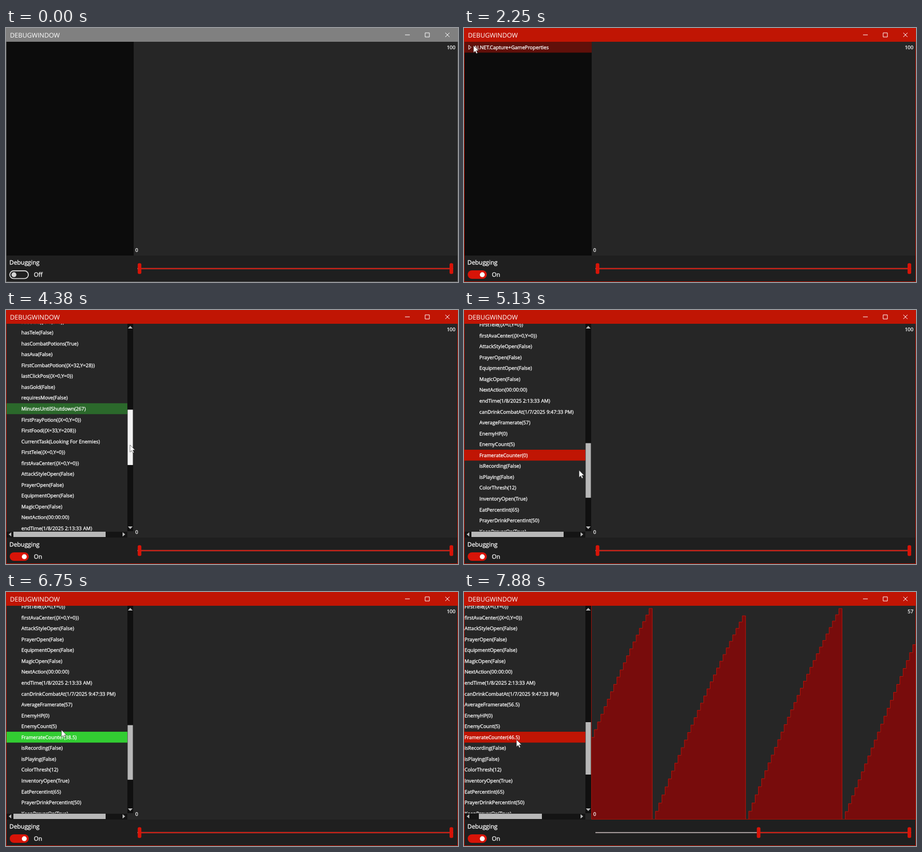
An HTML page that plays this animation: 853 px wide and 480 px high, repeating every 8 s.

```html
<!DOCTYPE html>
<html lang="en">
<head>
<meta charset="utf-8">
<title>Debug window</title>
<style>
  html, body { margin: 0; width: 100%; height: 100%; overflow: hidden; background: #1f1f1f; }
  svg { display: block; width: 853px; height: 480px; }
  text { font: 9.35px "Open Sans", "Noto Sans", sans-serif; fill: #fff; stroke: #fff; stroke-width: .3px;
    text-rendering: geometricPrecision; white-space: pre; }
  .title { font-size: 12.1px; stroke: none; }
  .label { font-size: 11.3px; }
</style>
</head>
<body>
<svg id="stage" viewBox="0 0 853 480"></svg>
<script>
const LOOP = 8000, STEP = 125, ROW = 20.55;
const TOGGLE = 1125, LISTED = 1500, EXPAND = 2625, SELECT = 7250, PLOT = 7500;
const RED = '#c01504', LIME = '#32cd32', PANEL = '#262626', GREY = '#b8b8b8';
const FRAMERATE = 'FramerateCounter', AVERAGE = 'AverageFramerate';

const point = '({X=0,Y=0})';
const items = `ContinueLoginScreenOpen(False)|withinFightArea(False)|LoginScreenOpen(False)
canCheckLocation(True)|StayInFightArea(False)|ReUpSupplies(False)|HPLevel(98)|playingScript(False)
FirstGold${point}|IsUnderAttack(False)|EquipmentDialogOpen(False)|EaseEndPoint${point}
isMouseDown(False)|BankOpen(False)|PrayerLevel(0)|canDrinkCombat(True)
WindowRect({X=1215,Y=648,Width=820,Height=640})|SuperCombatStarted(False)|hasFood(True)
hasPrayPotions(False)|isLoggedIn(True)|needsHeal(False)|CombatOpen(False)|isMoving(False)
TargetFound(False)|lastEnemyPos${point}|FirstAva${point}|hasTele(False)|hasCombatPotions(True)
hasAva(False)|FirstCombatPotion({X=32,Y=28})|lastClickPos${point}|hasGold(False)
requiresMove(False)|MinutesUntilShutdown(267)|FirstPrayPotion${point}|FirstFood({X=33,Y=208})
CurrentTask(Looking For Enemies)|FirstTele${point}|firstAvaCenter${point}|AttackStyleOpen(False)
PrayerOpen(False)|EquipmentOpen(False)|MagicOpen(False)|NextAction(00:00:00)
endTime(1/8/2025 2:13:33 AM)|canDrinkCombatAt(1/7/2025 9:47:33 PM)|${AVERAGE}|EnemyHP(0)
EnemyCount(5)|${FRAMERATE}|isRecording(False)|isPlaying(False)|ColorThresh(12)
InventoryOpen(True)|EatPercentInt(65)|PrayerDrinkPercentInt(50)|KeepPrayerOn(True)`.split(/[|\n]/);

// Rows that light up on a change and fade: name, start, colour
const flashes = [
  ['MinutesUntilShutdown', 4075, LIME], ['EnemyCount', 5575, RED], [AVERAGE, 7265, LIME]
];
const cursorPath = [
  [500, 150, 490], [1000, 24, 464], [1250, 24, 464], [2125, 18, 33], [2750, 18, 33],
  [3125, 29, 57], [3500, 234, 104], [3625, 234, 104], [4375, 234, 255], [4750, 234, 316],
  [5000, 234, 316], [5875, 116, 224], [6250, 116, 224], [7000, 99, 279]
];
const scrollPath = [[3625, 0], [4375, 569], [4750, 810]];

function follow(path, t) {
  const i = path.findIndex(p => p[0] > t);
  if (i < 0) return path[path.length - 1].slice(1);
  if (i === 0) return path[0].slice(1);
  const a = path[i - 1], b = path[i], k = (t - a[0]) / (b[0] - a[0]);
  return a.slice(1).map((v, j) => v + (b[j + 1] - v) * k);
}

const rect = (x, y, w, h, fill, more = '') =>
  `<rect x="${x}" y="${y}" width="${w}" height="${h}" fill="${fill}" ${more}/>`;
const path = (d, fill, stroke = 'none', more = '') =>
  `<path d="${d}" fill="${fill}" stroke="${stroke}" ${more}/>`;
const text = (x, y, s, more = '') => `<text x="${x}" y="${y}" ${more}>${s}</text>`;

// Frames counted since the last whole second; sample 0 is the latest reset
const sampleAt = t => 22 + Math.floor((t - 7875) * 0.0295 + 0.8);
const climb = (p, slope) => p * slope + p * (29 - p) * 0.01;
function frameRate(k) {
  if (k >= 0) return k % 29 * 2.12;
  if (k >= -30) return climb(k + 30, 1.94);
  if (k >= -59) return climb(k + 59, 1.93);
  return climb(((k + 59) % 29 + 29) % 29, 2);
}
const half = v => Math.floor(v * 2) / 2;

function titleBar(on) {
  const c = on ? RED : '#808080';
  return rect(0, 0, 853, 26, c) +
    path('M.5 26V479.5H852.5V26', 'none', on ? RED : '#555') +
    text(7.5, 17.7, 'DEBUGWINDOW', 'class="title"') +
    path('M753 13h9M791 9.2h8v7.8h-8zM829 9l8 8m0-8l-8 8', 'none', '#fff');
}

function rowContent(name, t) {
  if (name === FRAMERATE) return `${name}(${half(frameRate(sampleAt(t)))})`;
  if (name === AVERAGE) return `${name}(${t < SELECT ? 57 : 56.5})`;
  return name;
}

function rowLight(name, t) {
  if (name === FRAMERATE) {
    const k = sampleAt(t);
    return [t >= SELECT || frameRate(k) < frameRate(k - 1) ? RED : LIME, 1];
  }
  const f = flashes.find(([n]) => name.startsWith(n + '(') || name === n);
  return f && t >= f[1] ? [f[2], Math.max(0, 1 - (t - f[1]) / 500)] : [PANEL, 0];
}

function list(t) {
  if (t < LISTED) return '';
  const open = t >= EXPAND, [scroll] = follow(scrollPath, t);
  const shift = t >= SELECT ? 28 : 0, width = open ? 228 : 240;
  let s = open ? rect(1, 26, 240, 404, PANEL) : '';
  s += '<g clip-path="url(#list)">';
  const top = 26 - scroll;
  if (t >= 2000) s += rect(1, top, width, ROW, '#60100a');
  s += text(19 - shift, top + 13.7, 'AI.NET.Capture+GameProperties');
  s += open ? path(`M7 ${top + 13}h6v-6z`, RED)
            : path(`M9 ${top + 6.5}v8l4.5-4z`, 'none', '#fff');
  if (open) items.forEach((name, i) => {
    const y = top + (i + 1) * ROW;
    if (y < 0 || y > 420) return;
    const [color, alpha] = rowLight(name, t);
    if (alpha) s += rect(1, y, width, ROW, color, `opacity="${alpha}"`);
    s += text(29 - shift, y + 13.7, rowContent(name, t));
  });
  s += '</g>';
  return open ? s + scrollBars(t, scroll) : s;
}

function scrollBars(t, scroll) {
  const late = t >= SELECT, drag = t >= 3500 && t <= 5000;
  const y = late ? 246 : 39 + scroll * 0.2625, h = late ? 99 : 108 - scroll * 0.006;
  return rect(229, 26, 11, 392, '#101010') + rect(1, 419, 228, 11, '#141414') +
    rect(229.5, y, 10, h, drag ? '#f2f2f2' : GREY) +
    rect(late ? 28 : 14, 419, late ? 119 : 174, 10, GREY) +
    path('M230 35h9l-4.5-5zM230 409h9l-4.5 5zM10 420v8l-5-4zM220 420v8l5-4z', GREY);
}

function chart(t) {
  if (t < PLOT) return '';
  const last = sampleAt(t), w = 6.07, end = 853;
  let d = `M${end - 101 * w} 430`;
  for (let i = 100; i >= 0; i--) {
    d += `V${430 - frameRate(last - i) / 57 * 404}H${end - i * w}`;
  }
  return `<g clip-path="url(#chart)">${path(d + 'V430Z', '#780c0c', '#b8140a')}</g>` +
    path('M240.5 26V429.5H852', 'none', '#a01208');
}

function slider(t) {
  const x = t < SELECT ? 252 : 532 + (t - 7375) * 0.048;
  const thumb = cx => rect(cx - 3.4, 444.5, 6.8, 20.2, '#d81408', 'rx="2.5"');
  return rect(248, 453.8, 596, 1.7, '#c4b8b8') + rect(x, 453.7, 840 - x, 2, '#d81408') +
    thumb(x) + thumb(840.5);
}

function toggle(on) {
  const box = on ? rect(7, 458, 36, 16, '#d81408', 'rx="8"')
    : rect(7.2, 458.9, 35, 14.6, 'none', 'rx="7.3" stroke="#e4e4e4" stroke-width="1.7"');
  return text(6.5, 446.5, 'Debugging', 'class="label"') + box +
    `<circle cx="${on ? 34.5 : 15}" cy="466.2" r="4.6" fill="${on ? '#fff' : '#d4d4d4'}"/>` +
    text(52.5, 470, on ? 'On' : 'Off', 'class="label"');
}

function cursor(t) {
  const [x, y] = follow(cursorPath, t);
  return path('M0 0V13.5L3.2 10.6L5.3 15.3L7.5 14.3L5.4 9.7H9.6Z', '#fff', '#222',
    `stroke-width=".6" transform="translate(${x} ${y})"`);
}

function draw(t) {
  const on = t >= TOGGLE;
  return '<clipPath id="list"><path d="M1 26H' + (t < EXPAND ? 241 : 229) + 'V418H1Z"/></clipPath>' +
    '<clipPath id="chart"><path d="M241 26H852V430H241Z"/></clipPath>' +
    rect(0, 0, 853, 480, '#1f1f1f') + rect(1, 26, 240, 404, '#0c0c0c') +
    rect(241, 26, 611, 404, PANEL) + list(t) + chart(t) +
    text(848, 40, t < PLOT ? 100 : 57, 'text-anchor="end"') + text(244, 423, 0) +
    titleBar(on) + toggle(on) + slider(t) + cursor(t);
}

const stage = document.getElementById('stage');
const start = performance.now();
let shown = -1;
function tick() {
  const t = Math.floor((performance.now() - start) % LOOP / STEP) * STEP;
  if (t !== shown) stage.innerHTML = draw(shown = t);
  requestAnimationFrame(tick);
}
tick();
</script>
</body>
</html>
```
